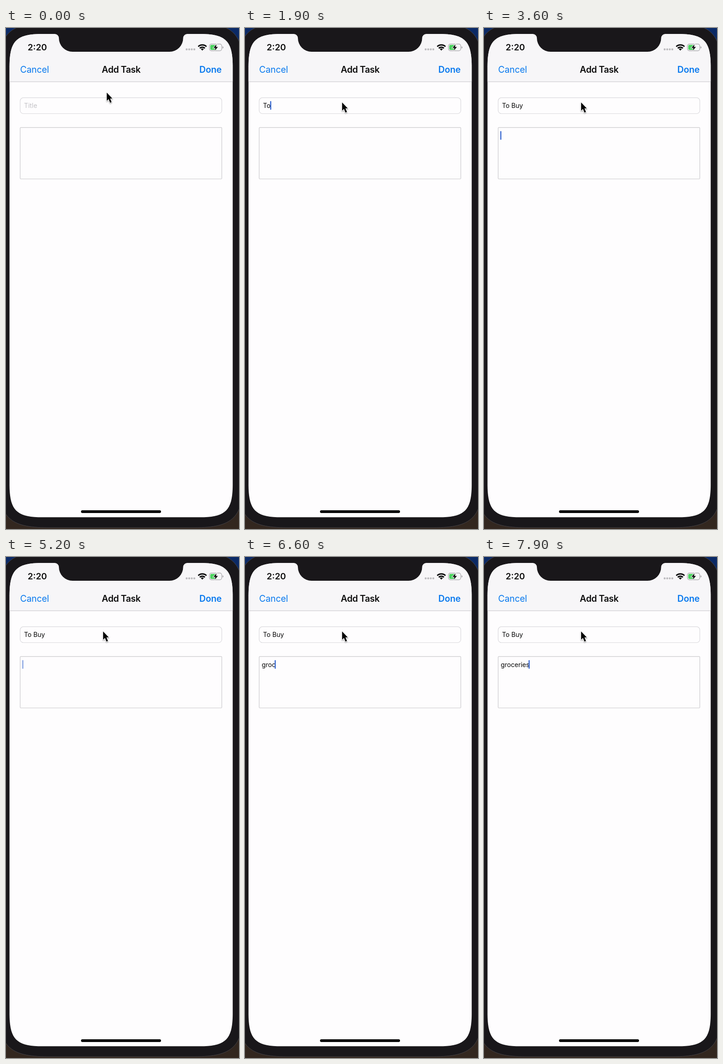
An HTML page for the animation above (8 s loop, 511 by 1097 pixels).

```html
<!DOCTYPE html>
<html lang="en">
<head>
<meta charset="utf-8">
<title>Add Task</title>
<style>
  html, body { margin: 0; width: 100%; height: 100%; overflow: hidden; background: #19171a; }
  svg { display: block; width: 100%; height: 100%; }
  text { font-family: Inter, "Liberation Sans", sans-serif; white-space: pre; }
  .nav { font-size: 19.5px; letter-spacing: -.1px; }
  .bold { font-weight: 600; }
  .link { fill: #0879ee; }
  .input { font-size: 14.1px; font-weight: 430; fill: #050505; }
</style>
</head>
<body>
<svg viewBox="0 0 511 1097">
  <defs>
    <linearGradient id="desktop" x2="0" y2="1">
      <stop offset="0" stop-color="#0b2a66"/>
      <stop offset=".5" stop-color="#1b1c26"/>
      <stop offset="1" stop-color="#33271f"/>
    </linearGradient>
    <clipPath id="screen"><path id="glass"/></clipPath>
    <filter id="shadow" x="-50%" y="-50%" width="200%" height="200%">
      <feDropShadow dx="0" dy="1.5" stdDeviation="1.3" flood-opacity=".4"/>
    </filter>
  </defs>

  <!-- Phone body and screen -->
  <rect width="511" height="1097" fill="url(#desktop)"/>
  <path id="body" fill="#19171a" stroke="#444246"/>
  <g clip-path="url(#screen)">
    <rect width="511" height="1097" fill="#fefdfe"/>
    <rect width="511" height="117" fill="#f7f6f8"/>
    <rect y="117" width="511" height="1.3" fill="#cfced2"/>
  </g>
  <path d="M107 12V13a9 9 0 0 1 9 9a30 30 0 0 0 30 30h212.500a30 30 0 0 0 30-30a9 9 0 0 1 9-9V12z" fill="#19171a"/>
  <rect x="164.5" y="1056" width="175.5" height="6" rx="3" fill="#050505"/>

  <!-- Status bar -->
  <text class="bold" x="47.5" y="49.3" font-size="19" fill="#0c0c0c">2:20</text>
  <path d="M396.2 46.7h17" stroke="#bdbcbf" stroke-width="4.4" stroke-linecap="round" stroke-dasharray="0 5.6"/>
  <g fill="none" stroke="#080808" stroke-width="3">
    <path d="M421.6 40.7a12.8 12.8 0 0 1 18 0"/>
    <path d="M425 44.4a7.9 7.9 0 0 1 11.2 0"/>
  </g>
  <path d="M427.4 46.2a4.5 4.5 0 0 1 6.4 0L430.6 49.5z" fill="#080808"/>
  <rect x="446.2" y="35.2" width="27" height="14.6" rx="4.2" fill="none" stroke="#a3a2a5" stroke-width="1.2"/>
  <path d="M475 40v5q1.6-.8 1.6-2.5t-1.6-2.5" fill="#8f8e91"/>
  <path d="M450.4 37h11.4v11h-11.4q-2.4 0-2.4-2.4v-6.2q0-2.4 2.4-2.4" fill="#4cd35f"/>
  <path d="M461.8 35.8l-7 7.8h4.3l-1.5 6 7.3-8h-4.4z" fill="#080808" stroke="#f7f6f8" stroke-width="2" paint-order="stroke"/>

  <!-- Navigation bar -->
  <text class="nav link" x="31" y="98">Cancel</text>
  <text class="nav bold" x="252.5" y="98" text-anchor="middle" fill="#0c0c0c" style="letter-spacing:-.35px">Add Task</text>
  <text class="nav bold link" x="473" y="98" text-anchor="end">Done</text>

  <!-- Form -->
  <g fill="none" stroke-width="1.2">
    <rect x="31.1" y="152.7" width="442.2" height="34.8" rx="7" stroke="#dad9dd"/>
    <rect x="31.1" y="217.8" width="442.2" height="112.7" rx="1.5" stroke="#cac9cc"/>
  </g>
  <text id="placeholder" class="input" x="39.6" y="174.7" style="fill:#c3c2c6">Title</text>
  <text id="title" class="input" x="39.6" y="174.7"></text>
  <text id="notes" class="input" x="36.8" y="240.7"></text>
  <rect id="caret" width="2.4" height="19" rx="1" fill="#3566d0"/>
  <path id="pointer" d="M0 0V18L4 14.3 7.3 22.2 10.6 20.700 7.400 13H12.400z" fill="#050505" stroke="#fff"
        stroke-width="2" paint-order="stroke" stroke-linejoin="round" filter="url(#shadow)"/>
</svg>
<script>
const LOOP = 8000;
const $ = id => document.getElementById(id);

// Rectangle whose corners ease gradually into the straight sides.
function smoothRect(left, top, right, bottom, reach) {
  const near = reach * .21;
  return `M${left} ${top + reach}
    C${left} ${top + near} ${left + near} ${top} ${left + reach} ${top} H${right - reach}
    C${right - near} ${top} ${right} ${top + near} ${right} ${top + reach} V${bottom - reach}
    C${right} ${bottom - near} ${right - near} ${bottom} ${right - reach} ${bottom} H${left + reach}
    C${left + near} ${bottom} ${left} ${bottom - near} ${left} ${bottom - reach} Z`;
}
$('glass').setAttribute('d', smoothRect(7.7, 13, 497.2, 1071.3, 72));
$('body').setAttribute('d', smoothRect(-16, -11, 521, 1094, 108));

// Times at which each character appears, after the field gains focus.
const fields = [
  { node: $('title'), value: 'To Buy', focus: 500, keys: [1500, 1900, 2500, 2700, 2900, 3100], caretX: 39.6, caretY: 160 },
  { node: $('notes'), value: 'groceries', focus: 3500, keys: [5800, 6100, 6300, 6600, 7100, 7500, 7600, 7800, 7900], caretX: 35.7, caretY: 225.7 }
];

const clamp = x => Math.min(1, Math.max(0, x));
const ease = x => (1 - Math.cos(Math.PI * clamp(x))) / 2;

// Solid, fade out, fade in, once per second.
function blink(elapsed) {
  const phase = elapsed % 1000;
  return 1 - ease((phase - 600) / 230) + ease((phase - 850) / 150);
}

function draw(t) {
  const move = ease(t / 300);
  $('pointer').setAttribute('transform', `translate(${221 - 8 * move} ${141.5 + 21.5 * move})`);

  for (const field of fields) {
    field.typed = field.keys.filter(time => time <= t).length;
    field.node.textContent = field.value.slice(0, field.typed);
  }
  $('placeholder').style.opacity = fields[0].typed ? 0 : 1;

  const active = fields.filter(field => field.focus <= t).pop();
  const caret = $('caret');
  if (!active) {
    caret.setAttribute('opacity', 0);
    return;
  }
  const lastChange = active.typed ? active.keys[active.typed - 1] : active.focus;
  const width = active.typed ? active.node.getComputedTextLength() - .9 : 0;
  caret.setAttribute('x', active.caretX + width);
  caret.setAttribute('y', active.caretY);
  caret.setAttribute('opacity', blink(t - lastChange));
}

const start = performance.now();
function tick() {
  draw((performance.now() - start) % LOOP);
  requestAnimationFrame(tick);
}
tick();
</script>
</body>
</html>
```
